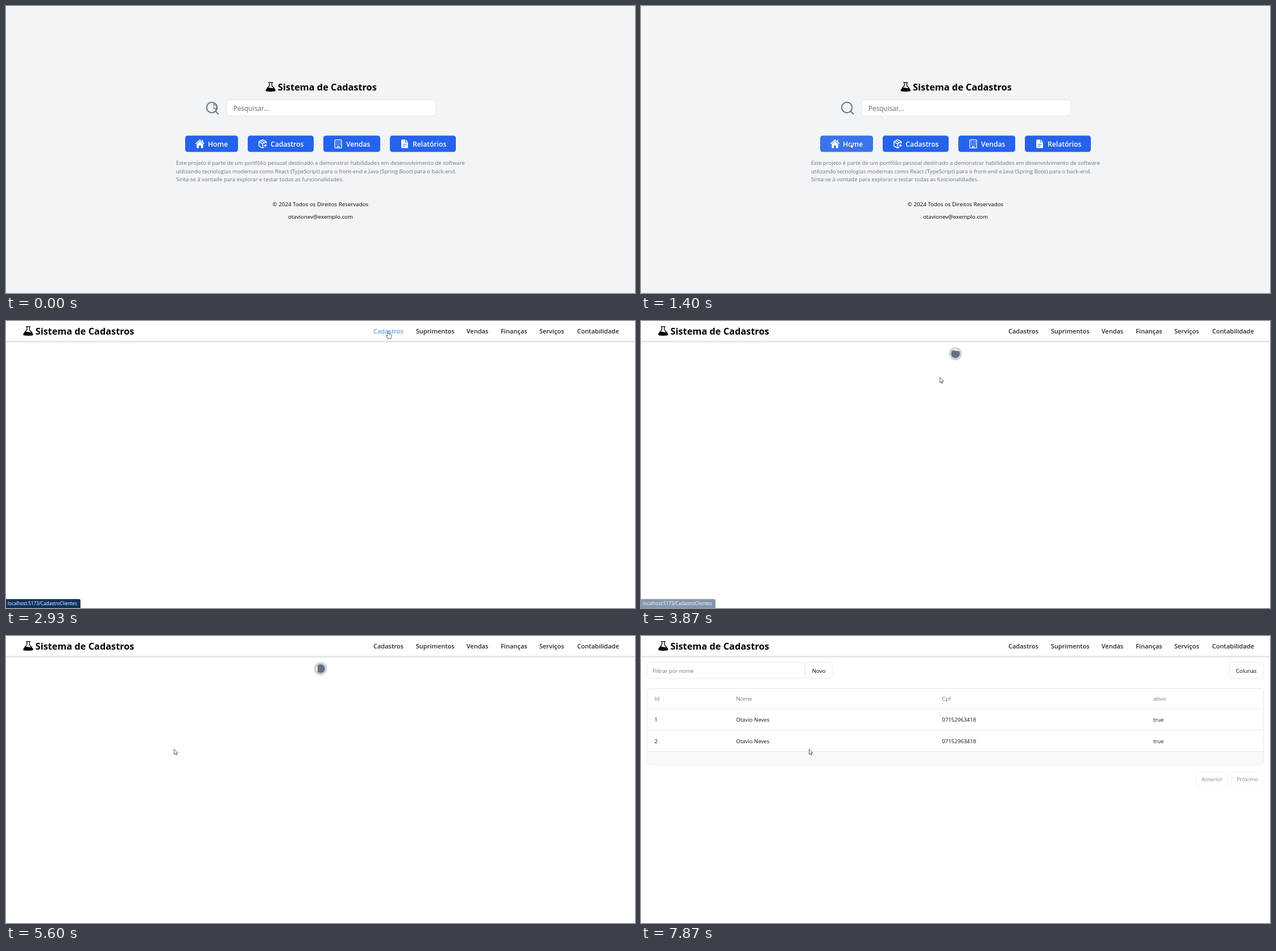
An HTML page that plays this animation: 1106 px wide and 506 px high, repeating every 8000 ms.

```html
<!DOCTYPE html>
<html lang="pt-BR">
<head>
<meta charset="utf-8">
<title>Sistema de Cadastros</title>
<style>
  html, body { margin: 0; width: 100%; height: 100%; overflow: hidden; background: #fff; }
  svg { display: block; width: 1106px; height: 506px; font-family: "Open Sans", "Noto Sans", sans-serif; }
  text { white-space: pre; }

  .title { font-size: 16.3px; font-weight: 700; }
  .semi { font-size: 9.75px; font-weight: 500; }
  .body { font-size: 9.53px; }
  .nav { font-size: 11px; font-weight: 600; fill: #1f2937; }
  .button { font-size: 12.15px; font-weight: 600; fill: #fff; }
  .muted { fill: #64748b; }
  .mid { text-anchor: middle; }
  .box { fill: #fff; stroke: #e5e9ef; }
  .line { fill: none; stroke-linecap: round; stroke-linejoin: round; }
  .pointer { fill: #fff; stroke: #333; stroke-width: .8; stroke-linejoin: round; }
  .bar { filter: drop-shadow(0 1.5px 2px rgba(0, 0, 0, .22)); }

  .cursor { animation: move 8s ease-in-out infinite; }
  .home-btn { fill: #2563eb; animation: press 8s linear infinite; }
  .app { animation: app 8s step-end infinite; }
  .link { animation: link 8s linear infinite; }
  .status { animation: status 8s linear infinite; }
  .loader { animation: loader 8s step-end infinite; }
  .table { animation: table 8s step-end infinite; }
  .arrow { animation: arrow 8s step-end infinite; }
  .hand { animation: hand 8s step-end infinite; }
  .spin { animation: spin 1s linear infinite; }

  @keyframes move {
    0%, .9% { transform: translate(365px, 172px); }
    10.9%, 11.6% { transform: translate(371px, 245px); }
    12.5%, 18.4% { transform: translate(368px, 242px); }
    23.3%, 28.4% { transform: translate(284px, 177px); }
    35.5%, 43.1% { transform: translate(672px, 18px); }
    48.3%, 51% { transform: translate(525px, 99px); }
    61% { transform: translate(430px, 190px); animation-timing-function: linear; }
    65.6% { transform: translate(330px, 206px); }
    69.4%, 100% { transform: translate(295px, 199px); }
  }
  @keyframes press { 0%, 7.3% { fill: #2563eb; } 9%, 100% { fill: #3b73ec; } }
  @keyframes app { 0% { visibility: hidden; } 18.4%, 100% { visibility: visible; } }
  @keyframes link {
    0%, 34.7%, 45.6%, 100% { fill: #1f2937; }
    36.4%, 43.8% { fill: #60a0ee; }
  }
  @keyframes status {
    0%, 35%, 50%, 100% { opacity: 0; }
    36.4%, 46.8% { opacity: 1; }
  }
  @keyframes loader { 0% { opacity: 0; } 43.1% { opacity: 1; } 98.3%, 100% { opacity: 0; } }
  @keyframes table { 0% { opacity: 0; } 98.3%, 100% { opacity: 1; } }
  @keyframes arrow { 0% { opacity: 1; } 34.7% { opacity: 0; } 43.8%, 100% { opacity: 1; } }
  @keyframes hand { 0% { opacity: 0; } 34.7% { opacity: 1; } 43.8%, 100% { opacity: 0; } }
  @keyframes spin { from { transform: rotate(324deg); } to { transform: rotate(684deg); } }
</style>
</head>
<body>
<svg viewBox="0 0 1106 506" xmlns="http://www.w3.org/2000/svg">
  <defs>
    <g id="brand">
      <path d="M5.3.8H12.7M6.8 .8V6.6L3 10.8M11.2 .8V6.6L15 10.8" fill="none" stroke="#000" stroke-width="1.3" stroke-linecap="round"/>
      <path d="M3.4 10.2Q6 9.2 9 10.2T14.6 10.2L17.2 13C18.5 14.9 17.6 16.2 15.6 16.5Q9 17.4 2.4 16.5C.4 16.2-.5 14.9.8 13Z"/>
      <text class="title" x="21.8" y="15">Sistema de Cadastros</text>
    </g>
  </defs>

  <!-- Landing page -->
  <rect width="1106" height="506" fill="#f3f4f6"/>
  <use href="#brand" x="456.3" y="134"/>
  <g class="line" stroke="#64748b" stroke-width="2">
    <circle cx="362" cy="179" r="9.2"/>
    <path d="M368.7 185.7L373.2 190.2"/>
  </g>
  <rect x="388" y="165.5" width="368" height="28.3" rx="4.5" fill="#fff" stroke="#dfe3e9"/>
  <text x="399.7" y="185" font-size="11.85" fill="#606875">Pesquisar...</text>

  <g fill="#2563eb">
    <rect class="home-btn" x="315" y="228.5" width="93" height="28.8" rx="4.5"/>
    <rect x="425" y="228.5" width="116" height="28.8" rx="4.5"/>
    <rect x="558" y="228.5" width="100" height="28.8" rx="4.5"/>
    <rect x="675" y="228.5" width="116" height="28.8" rx="4.5"/>
  </g>
  <g class="button">
    <text x="355" y="247.7">Home</text>
    <text x="465.2" y="247.7">Cadastros</text>
    <text x="598" y="247.7">Vendas</text>
    <text x="715" y="247.7">Relatórios</text>
  </g>
  <path d="M335.4 243.2L341 238 346.6 243.2V250.4H342.8V246H339.2V250.4H335.4Z" fill="#fff"/>
  <path class="line" d="M333.8 242.6L341 236 348.2 242.6M345.8 236.5V239.5" stroke="#fff" stroke-width="1.5"/>
  <g class="line" transform="translate(442.5 234.4) scale(.72)" stroke="#fff" stroke-width="2">
    <path d="M16 16h6M19 13v6M21 10V8a2 2 0 0 0-1-1.7l-7-4a2 2 0 0 0-2 0l-7 4A2 2 0 0 0 3 8v8a2 2 0 0 0 1 1.7l7 4a2 2 0 0 0 2 0l2-1.1M7.5 4.3l9 5.1M3.3 7L12 12l8.7-5M12 22V12"/>
  </g>
  <g class="line" stroke="#fff" stroke-width="1.3">
    <rect x="578.2" y="235.8" width="11.8" height="14.6" rx="1"/>
    <path d="M581.2 239H587.5M581.2 241.8H587.5M581.2 244.6H587.5" stroke-width="1.5" stroke-dasharray="0 3.1"/>
    <path d="M582.5 250V247.5H585.7V250"/>
  </g>
  <path d="M696.5 235.5H702V240.5H707V249Q707 250.5 705.5 250.5H696.5Q695 250.5 695 249V237Q695 235.5 696.5 235.5ZM703 235.5L707 239.5H703Z" fill="#fff"/>
  <path class="line" d="M698 244H704M698 247H702" stroke="#2563eb" stroke-width="1.1"/>

  <g class="body muted">
    <text x="299" y="280.4">Este projeto é parte de um portfólio pessoal destinado a demonstrar habilidades em desenvolvimento de software</text>
    <text x="299" y="294.8">utilizando tecnologias modernas como React (TypeScript) para o front-end e Java (Spring Boot) para o back-end.</text>
    <text x="299" y="309.2">Sinta-se à vontade para explorar e testar todas as funcionalidades.</text>
  </g>
  <g class="semi mid">
    <text x="553" y="352.8">© 2024 Todos os Direitos Reservados</text>
    <text x="553" y="374.6">otavionev@exemplo.com</text>
  </g>

  <!-- Application -->
  <g class="app">
    <rect width="1106" height="506" fill="#fff"/>
    <rect class="bar" x="-5" y="-5" width="1116" height="40" fill="#fff"/>
    <use href="#brand" x="30" y="9"/>
    <g class="nav">
      <text class="link" x="646" y="21.8">Cadastros</text>
      <text x="720.7" y="21.8">Suprimentos</text>
      <text x="809.7" y="21.8">Vendas</text>
      <text x="870" y="21.8">Finanças</text>
      <text x="937.7" y="21.8">Serviços</text>
      <text x="1004.2" y="21.8">Contabilidade</text>
    </g>

    <g class="loader">
      <g transform="translate(553 57.6)">
        <circle r="9.6" fill="none" stroke="#d0d3d8" stroke-width="3.8"/>
        <path class="spin" d="M5.3-5.7A7.8 7.8 0 1 0 5.3 5.7Z" fill="#667080"/>
      </g>
    </g>

    <g class="table">
      <g class="box">
        <rect x="11.5" y="46.5" width="276.5" height="28.3" rx="4.5"/>
        <rect x="288.5" y="46.5" width="48.3" height="28.3" rx="4.5"/>
        <rect x="1034.5" y="46.5" width="60" height="28.3" rx="4.5"/>
        <rect x="11.5" y="92.5" width="1083" height="134.5" rx="4.5"/>
        <path d="M12 203.5H1094V223Q1094 226.5 1090 226.5H16Q12 226.5 12 223Z" fill="#f8f9fb" stroke="none"/>
        <path d="M12 127.5H1094M12 165.5H1094M12 203.5H1094"/>
        <rect x="976.5" y="239.5" width="55.5" height="25.3" rx="4" stroke="#eff2f6"/>
        <rect x="1038.5" y="239.5" width="55.5" height="25.3" rx="4" stroke="#eff2f6"/>
      </g>
      <text class="body muted" x="20.7" y="64.9">Filtrar por nome</text>
      <g class="semi mid">
        <text x="312.6" y="64.9">Novo</text>
        <text x="1064.2" y="64.9">Colunas</text>
        <g fill="#858991">
          <text x="1004.2" y="256">Anterior</text>
          <text x="1066.2" y="256">Próximo</text>
        </g>
      </g>
      <g class="semi muted">
        <text x="23.7" y="113.8">Id</text>
        <text x="167.3" y="113.8">Nome</text>
        <text x="529.3" y="113.8">Cpf</text>
        <text x="900.7" y="113.8">ativo</text>
      </g>
      <g class="body" fill="#111">
        <text x="23.7" y="150.6">1</text>
        <text x="23.7" y="188.6">2</text>
        <g id="row">
          <text x="167.3" y="150.6">Otavio Neves</text>
          <text x="529.3" y="150.6">07152963418</text>
          <text x="900.7" y="150.6">true</text>
        </g>
        <use href="#row" y="38"/>
      </g>
    </g>

    <g class="status">
      <path d="M0 490.3H128Q131 490.3 131 493.3V506H0Z" fill="#0e315f"/>
      <text x="3" y="501.3" font-size="8.15" fill="#fff">localhost:5173/CadastroClientes</text>
    </g>
  </g>

  <g class="cursor">
    <path class="pointer arrow" d="M.4.4V9.8L2.5 7.8 4 11 5.4 10.4 4 7.2H7Z"/>
    <path class="pointer hand" d="M-1.2 7V1.1A1.1 1.1 0 0 1 1 1.1V5L4.6 5.8Q5.7 6.1 5.7 7.2V9.5Q5.7 11 5 12V13H-1V11.8L-3.7 8.4Q-4.1 7.3-3.2 7-2.4 6.9-1.2 8.4Z"/>
  </g>
</svg>
</body>
</html>
```
